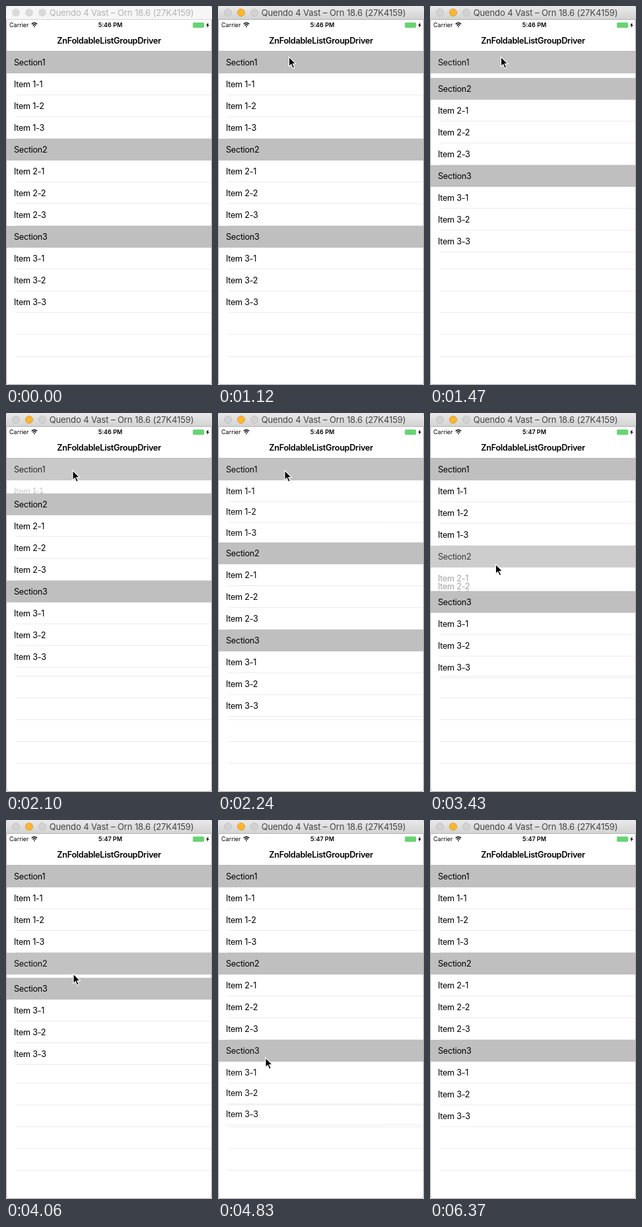
Animation, 312 px wide and 574 px high, one loop 6.51 s. Source, as an HTML page:

```html
<!DOCTYPE html>
<html lang="en">
<head>
<meta charset="utf-8">
<title>Collapsible sections</title>
<style>
  html, body { margin: 0; width: 100%; height: 100%; overflow: hidden; background: #fff; }
  #stage { position: relative; width: 312px; height: 574px; overflow: hidden; background: #fff;
    font-family: Inter, "Liberation Sans", sans-serif; color: #000; white-space: nowrap; }
  #stage div, #stage svg { position: absolute; box-sizing: border-box; }
  #bar { left: 0; top: 0; width: 312px; height: 21px; border-radius: 4px 4px 0 0;
    background: #f6f6f6; color: #b4b4b4; border-bottom: 1px solid #d5d5d5; }
  #bar.active { background: linear-gradient(#e9e9e9, #d3d3d3); color: #444; border-color: #b4b4b4; }
  #bar div { top: 4px; width: 12px; height: 12px; border-radius: 50%; background: #dadada; }
  #bar.active div { background: #d2d2d2; border: 1px solid #c2c2c2; }
  #bar.active .mini { background: #fdb62f; border-color: #e0a02c; }
  #bar span { position: absolute; left: 19px; width: 312px; text-align: center;
    font-size: 13px; line-height: 21px; letter-spacing: -.1px; }
  .status { top: 22px; font-size: 9px; line-height: 14px; }
  #nav { left: 0; top: 36px; width: 312px; height: 33px; text-align: center; line-height: 33px;
    font-size: 12.7px; font-weight: 600; letter-spacing: -.3px; border-bottom: 1px solid #b8b8b8; }
  .row, .head { left: 0; top: 0; width: 312px; height: 33px; padding-left: 12px;
    font-size: 12.7px; line-height: 33px; letter-spacing: -.3px; }
  .head { background: #bfbfbf; }
  .row::after { content: ""; position: absolute; left: 15px; right: 1px; bottom: 0; height: 1px; background: #ebebeb; }
  #frame { inset: 0; border: 1px solid #a4a4a4; border-top: 0; border-radius: 0 0 4px 4px; }
</style>
</head>
<body>
<div id="stage">
  <div id="list"></div>
  <div id="nav">ZnFoldableListGroupDriver</div>
  <div class="status" style="left:5px">Carrier</div>
  <div class="status" id="clock" style="left:2px;width:312px;text-align:center;font-weight:600"></div>
  <svg width="312" height="40" style="left:0;top:0">
    <g fill="none" stroke="#000" stroke-width="1.4">
      <path d="M38.8 27.3q4.2-3.8 8.4 0M40.5 29.4q2.5-2.2 5 0"/>
    </g>
    <path d="M41.7 30.9q1.3-1 2.6 0L43 32.4z"/>
    <rect x="283" y="25" width="17" height="8" rx="1.5" fill="#68d474"/>
    <path d="M300.8 27.5q1.2 1.5 0 3z" fill="#68d474"/>
    <path d="M306.5 25l-3.5 4.4h2l-.8 3.6 3.6-4.6h-2z"/>
  </svg>
  <div id="frame"></div>
  <div id="bar">
    <div style="left:9px"></div><div class="mini" style="left:29px"></div><div style="left:49px"></div>
    <span>Quendo 4 Vast – Orn 18.6 (27K4159)</span>
  </div>
  <svg id="cursor" width="16" height="22" viewBox="-2 -2 16 22" style="left:-2px;top:-2px">
    <path d="M0 0V14.6L3.3 11.5 5.7 17.2 8.2 16.1 5.8 10.5H10.4Z" stroke="#fff" stroke-width="1.1"/>
  </svg>
</div>
<script>
const LOOP = 6510, STEP = 70, ROW = 33, TOP = 69;
const CURVE = [.05, .3, .64, .93, 1];

// start time, section, opening or closing, progress per step
const moves = [
  { at: 1260, section: 0, open: false, curve: CURVE },
  { at: 2100, section: 0, open: true, curve: [.2, .65, .95, .95, 1] },
  { at: 3290, section: 1, open: false, curve: CURVE },
  { at: 4060, section: 1, open: true, curve: CURVE },
  { at: 4830, section: 2, open: false, curve: CURVE },
  { at: 5530, section: 2, open: true, curve: CURVE }
];

// time, x, y of the pointer tip
const path = [
  [70, 24, 428], [560, 118, 80], [700, 107.5, 77], [1680, 107.5, 77], [1960, 101, 87],
  [2310, 101, 87], [3010, 99.5, 229], [3710, 99.5, 229], [3780, 109, 231], [3920, 102, 233],
  [4200, 102, 233], [4690, 72, 360], [4830, 72, 360], [5110, 80, 358], [5180, 80, 358],
  [5390, 78, 364], [5600, 78, 364], [6020, 311, 445]
];

const $ = id => document.getElementById(id);
const list = $("list"), bar = $("bar"), clock = $("clock"), cursor = $("cursor");

function add(cls, text) {
  const el = document.createElement("div");
  el.className = cls;
  el.textContent = text;
  list.append(el);
  return el;
}

const place = (el, y) => { el.style.transform = `translateY(${y}px)`; };

const blanks = [10, 11, 12, 13, 14].map(n => {
  const y = TOP + (n - 1) * ROW, el = add("row", "");
  place(el, y);
  return { el, bottom: y + ROW };
});

const sections = [1, 2, 3].map(s => ({
  head: add("head", "Section" + s),
  rows: [1, 2, 3].map(i => add("row", `Item ${s}-${i}`))
}));

function drawList(t) {
  const move = moves.filter(m => m.at <= t).pop();
  let fold = 0;
  if (move) {
    const k = Math.min((t - move.at) / STEP, move.curve.length - 1);
    fold = move.open ? 1 - move.curve[k] : move.curve[k];
  }
  let y = TOP;
  sections.forEach(({ head, rows }, s) => {
    const p = move && move.section === s ? fold : 0;
    const blend = 1 - p * (1 - p);
    place(head, y);
    if (s < 2) head.style.opacity = blend;
    else head.style.color = `rgba(0,0,0,${blend})`;
    y += ROW;
    rows.forEach((row, i) => {
      place(row, y + i * ROW * (1 - p));
      row.style.opacity = 1 - p;
    });
    y += rows.length * ROW * (1 - p);
  });
  const closing = move && !move.open;
  blanks.forEach(({ el, bottom }) => {
    el.style.visibility = closing || bottom > y + .5 ? "visible" : "hidden";
  });
}

function drawCursor(t) {
  const n = path.findIndex(p => p[0] > t);
  cursor.style.visibility = n > 0 ? "visible" : "hidden";
  if (n < 1) return;
  const [t0, x0, y0] = path[n - 1], [t1, x1, y1] = path[n];
  const u = (t - t0) / (t1 - t0), e = u * u * (3 - 2 * u);
  cursor.style.transform = `translate(${x0 + (x1 - x0) * e}px, ${y0 + (y1 - y0) * e}px)`;
}

function draw(now) {
  const t = Math.floor((now % LOOP) / STEP) * STEP;
  bar.className = t >= 910 ? "active" : "";
  clock.textContent = t < 2700 ? "5:46 PM" : "5:47 PM";
  drawList(t);
  drawCursor(t);
}

const start = performance.now();
function tick() {
  draw(performance.now() - start);
  requestAnimationFrame(tick);
}
tick();
</script>
</body>
</html>
```
